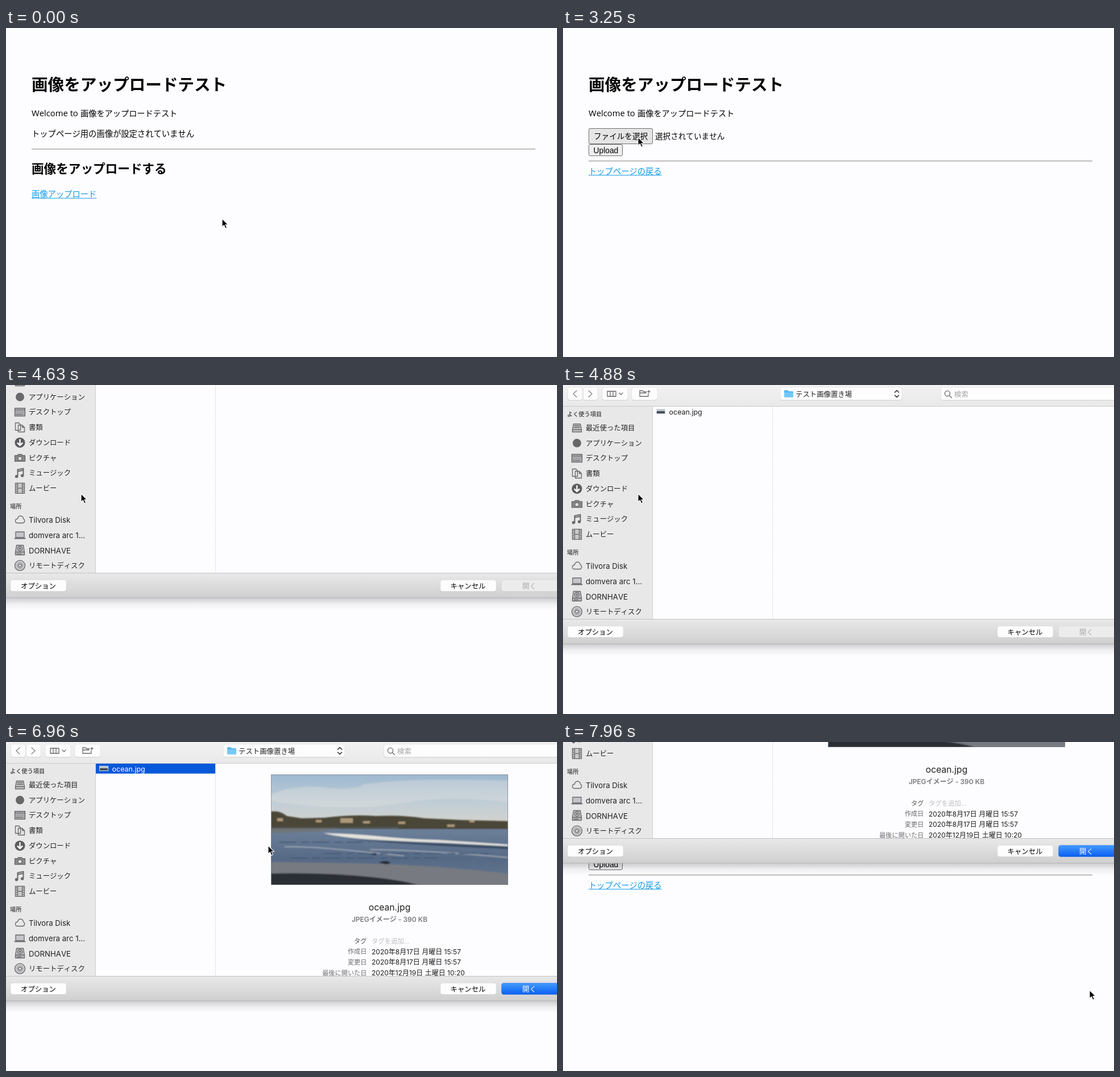
An HTML page for the animation above (8000 ms loop, 969 by 578 pixels).

```html
<!DOCTYPE html>
<html lang="ja">
<head>
<meta charset="utf-8">
<title>画像をアップロードテスト</title>
<style>
  html, body { margin: 0; width: 100%; height: 100%; overflow: hidden; background: #fdfdff; }
  svg { display: block; width: 969px; height: 578px; }
  text { font-family: Inter, 'Noto Sans CJK JP', 'Noto Sans CJK', sans-serif; font-kerning: none; white-space: pre; }
  .page text { font-family: 'Noto Sans CJK JP', 'Noto Sans CJK', sans-serif; }
  .page .welcome { font-family: 'Open Sans', 'Noto Sans', sans-serif; }
  .page .latin { font-family: 'Liberation Sans', Arial, sans-serif; }
  .icon { fill: none; stroke: #68686a; stroke-width: 1.3; stroke-linejoin: round; stroke-linecap: round; }
</style>
</head>
<body>
<svg id="stage" viewBox="0 0 969 578" xmlns="http://www.w3.org/2000/svg"></svg>
<script>
const LOOP = 8000, FPS = 24;
const LINK = '#109be6';

// y is the middle of the line
const text = (x, y, size, str, attrs = '') =>
  `<text x="${x}" y="${(y + size * 0.38).toFixed(1)}" font-size="${size}" ${attrs}>${str}</text>`;
const rect = (x, y, w, h, fill, attrs = '') =>
  `<rect x="${x}" y="${y}" width="${w}" height="${h}" fill="${fill}" ${attrs}/>`;
const path = (d, attrs = '') => `<path d="${d}" ${attrs}/>`;
const group = (id, body, attrs = '') => `<g id="${id}" ${attrs}>${body}</g>`;
const gradient = (id, ...colors) =>
  `<linearGradient id="${id}" x2="0" y2="1">${colors.map((c, i) =>
    `<stop offset="${i / (colors.length - 1)}" stop-color="${c}"/>`).join('')}</linearGradient>`;

const rule = y => rect(45, y, 886, 1, '#98948f') + rect(45, y + 1, 886, 1, '#e9e9ea');
const link = (y, str) =>
  text(45, y, 14.3, str, `fill="${LINK}"`) + rect(45, y + 6.6, str.length * 14.3, 1, LINK);
const formButton = (id, y, w, h) =>
  rect(45.5, y + .5, w - 1, h - 1, '#efefef', `id="${id}" rx="2.5" stroke="#6f6f72"`);
const macButton = (x, y, w, h, attrs = '') =>
  rect(x, y + .8, w, h, '#c2c2c2', 'rx="4"') + rect(x, y, w, h, '#fdfdfd', `rx="4" stroke="#d6d6d6" stroke-width=".5" ${attrs}`);

const heading =
  text(45, 99, 28.6, '画像をアップロードテスト', 'font-weight="700"') +
  text(45, 149.7, 14.8, 'Welcome to', 'class="welcome"') +
  text(131, 150, 14.2, '画像をアップロードテスト');

const topPage =
  text(45, 186, 14.3, 'トップページ用の画像が設定されていません') + rule(212) +
  text(45, 247, 21.6, '画像をアップロードする', 'font-weight="700"') +
  link(292, '画像アップロード');

const uploadPage =
  formButton('choose', 176, 113, 28) + text(54, 189.3, 13.6, 'ファイルを選択') +
  text(162, 189.3, 13.6, '選択されていません') +
  formButton('send', 204, 60, 21) + text(53.5, 214.3, 13.8, 'Upload', 'class="latin"') +
  rule(233) + link(251.5, 'トップページの戻る');

// Sidebar glyphs, centred on 0,0
const glyphs = {
  recent: path('M-6-7H6L8 3V7H-8V3ZM-8 3H8', 'fill="#c4c4c5"') + path('M-4.500-4H4.500M-5-1H5'),
  dot: '<circle r="7.5" fill="#68686a" stroke="none"/>',
  desk: rect(-9, -7, 18, 14, '#a6a6a8') + path('M-9-4H9M-6 4H6', 'stroke-dasharray="2 2"'),
  docs: path('M-8-8H-2L1-5V5H-8ZM-3-4H4L8 0V8H-3ZM4-4V0H8', 'fill="#e4e4e5"'),
  down: '<circle r="9" fill="#5d5d5f" stroke="none"/>' +
    path('M0-5V4M-4 1L0 5L4 1', 'stroke="#fff" stroke-width="2.4"'),
  camera: path('M-9-4H-5L-3-6H3L5-4H9V6H-9Z', 'fill="#88888a"') + '<circle cy="1" r="3.5" fill="#ddd"/>',
  music: path('M-4 6V-6L6-8V4M-4-3L6-5', 'stroke-width="2"') +
    '<circle cx="-6" cy="6" r="2" fill="#68686a"/><circle cx="4" cy="4.5" r="2" fill="#68686a"/>',
  film: rect(-8, -9, 16, 18, '#c9c9ca') + path('M-4-9V9M4-9V9M-4 0H4') +
    path('M-6-7V8M6-7V8', 'stroke-dasharray="1.5 2.5"'),
  cloud: path('M-5 5.5H5A4 4 0 0 0 6-2A5 5 0 0 0-4-2A3.8 3.8 0 0 0-5 5.5Z'),
  laptop: rect(-7.5, -6, 15, 10, '#c4c4ca') + path('M-9 5.5H9', 'stroke-width="2"'),
  disk: path('M-6-9H6L8 3V8H-8V3ZM-8 3H8', 'fill="#bcbcbe"') + '<circle cy="-3" r="4"/><circle cy="-3" r="1"/>' + path('M-5 6H2'),
  disc: '<circle r="9" fill="#c9c9cb"/><circle r="5" stroke-width=".6"/><circle r="2.5" fill="#eee"/>'
};
const places = [
  [75.5, 'recent', '最近使った項目'], [102, 'dot', 'アプリケーション'], [128.7, 'desk', 'デスクトップ'],
  [155.5, 'docs', '書類'], [182.2, 'down', 'ダウンロード'], [209, 'camera', 'ピクチャ'],
  [235.7, 'music', 'ミュージック'], [262.3, 'film', 'ムービー'], [318, 'cloud', 'Tilvora Disk'],
  [345, 'laptop', 'domvera arc 1...'], [371.5, 'disk', 'DORNHAVE'], [398.2, 'disc', 'リモートディスク']
];
const section = (y, str) => text(7, y, 10.2, str, 'font-weight="600" fill="#58585a"');
const sidebar = rect(0, 38, 157, 373, '#e8e8e8') + rect(157, 38, 1, 373, '#cfcfd0') +
  section(51.5, 'よく使う項目') + section(294.5, '場所') +
  places.map(([y, glyph, name]) =>
    `<g class="icon" transform="translate(24.5 ${y})">${glyphs[glyph]}</g>` +
    text(40, y, /[a-z]/i.test(name) ? 13.2 : 12.35, name, 'fill="#222"')).join('');

const toolbar = rect(0, 0, 969, 37, 'url(#bar)') + rect(0, 37, 969, 1, '#cbcbcc') +
  macButton(8.5, 4, 25.5, 22.5) + macButton(35.5, 4, 25.5, 22.5) +
  macButton(69, 4, 45, 22.5) + macButton(121, 4, 45, 22.5) +
  macButton(382, 4, 214, 22.5) + macButton(664.5, 4, 330, 22.5) +
  '<g class="icon">' +
  path('M24 10L18 15.5L24 21M45 10L51 15.5L45 21', 'stroke="#828284"') +
  path('M78 11H93V20H78ZM83 11V20M88 11V20M99 14L102 17L105 14') +
  path('M150 15V20H135V10H140L142 12H147M135 14H146M151 9.500V13.500M149 11.500H153') +
  path('M583.500 13L587 9.500L590.500 13M583.500 18L587 21.500L590.500 18', 'stroke="#333" stroke-width="1.6"') +
  '<circle cx="676" cy="15" r="4.600"/>' + path('M679.500 18.500L683.500 22.500') + '</g>' +
  path('M389 10.500Q389 9 390.500 9H395L397 11H403.500Q405 11 405 12.500V20Q405 21.500 403.500 21.500H390.500Q389 21.500 389 20Z', 'fill="#5bb7ee"') +
  rect(389, 13, 16, 8.5, '#74c8f8', 'rx="1"') +
  text(409, 15.8, 12.4, 'テスト画像置き場', 'fill="#222"') + text(688, 15.8, 12.4, '検索', 'fill="#a3a3a5"');

const footer = rect(0, 411, 969, 44, 'url(#foot)') + rect(0, 411, 969, 1, '#c2c2c2') +
  rect(0, 454.5, 969, 1, '#b0b0b8') + rect(0, 455.5, 969, 20.5, 'url(#shade)') +
  macButton(8, 423.5, 98, 20) + text(57, 434, 12.4, 'オプション', 'text-anchor="middle"') +
  macButton(764, 423.5, 98, 20) + text(812.5, 434, 12.4, 'キャンセル', 'text-anchor="middle"') +
  macButton(871.5, 423.5, 120, 20, 'id="open"') + text(908, 434, 12.4, '開く', 'id="openLabel"');

const details = [['タグ', 'タグを追加...'], ['作成日', '2020年8月17日 月曜日 15:57'],
  ['変更日', '2020年8月17日 月曜日 15:57'], ['最後に開いた日', '2020年12月19日 土曜日 10:20']];
const info =
  text(674.5, 290, 15.8, 'ocean.jpg', 'text-anchor="middle" fill="#222"') +
  text(674.5, 311.5, 12, 'JPEGイメージ - 390 KB', 'text-anchor="middle" font-weight="600" fill="#7b7b7d"') +
  details.map(([label, value], i) => {
    const y = 349.5 + i * 18.6;
    return text(634.5, y, 11.2, label, `text-anchor="end" fill="${i ? '#6d6d6f' : '#555'}"`) +
      text(643, y, i ? 12 : 11.4, value, `fill="${i ? '#1c1c1c' : '#bdbdc0'}"`);
  }).join('');

const scenery =
  path('M466 92Q510 74 560 80T630 74Q720 62 883 68V106Q780 92 690 108T466 104Z', 'fill="#e9e5df" opacity=".35"') +
  path('M466 122Q482 120 494 130L520 134L560 133Q610 127 650 130Q700 128 735 134L800 137L883 139V154H466Z', 'fill="#4b4737"') +
  [[477, 134, 10, 5], [545, 137, 10, 4], [588, 134, 22, 8], [628, 139, 12, 4], [690, 140, 12, 4], [776, 145, 13, 4], [815, 138, 9, 3]]
    .map(([x, y, w, h]) => rect(x, y, w, h, '#ae9a79')).join('') +
  path('M466 150H560L690 149V154H466Z', 'fill="#555657"') +
  rect(460, 153, 430, 104, 'url(#sea)') +
  path('M466 160L555 157L590 152H466Z', 'fill="#6f7478"') +
  path('M558 160Q610 161 660 166T760 172L883 180V183L770 177Q690 174 640 171T558 160Z', 'fill="#e4e2dc"') +
  path('M600 171Q700 176 883 184V188Q740 183 600 171Z', 'fill="#374860"') +
  path('M490 184Q540 184 590 189T700 200M640 189Q740 190 883 203', 'fill="none" stroke="#a9b0ba" stroke-width="1.500"') +
  path('M480 176H640M560 196H850M500 204H760', 'stroke="#43566f" stroke-dasharray="30 9 14 6" stroke-width="1.500"') +
  path('M466 211Q560 212 650 214T883 231V257H466Z', 'fill="#777a80"') +
  path('M466 231Q560 229 640 237T735 257H466Z', 'fill="#2c2e34"') +
  path('M640 197L652 195L650 199ZM655 212Q667 206 677 212L670 215Z', 'fill="#262a32"');
const photo = rect(466, 57, 417, 98, 'url(#sky)') +
  `<g clip-path="url(#frame)"><g filter="url(#soft)">${scenery}</g></g>` +
  rect(466.5, 57.5, 416, 193, 'none', 'stroke="#777c84" stroke-opacity=".6"');

const fileRow = rect(158, 38, 210, 17.5, '#0558d9', 'id="rowFill"') +
  rect(164.5, 42.5, 15, 8, '#b9c5cd', 'stroke="#dadada"') + rect(165, 46, 14, 4, '#44505c') +
  text(186.5, 47.5, 12.5, 'ocean.jpg', 'id="rowLabel"');

const dialog = rect(0, 0, 969, 455, '#fdfdff') + toolbar + sidebar +
  path('M368.500 38V411', 'stroke="#d8d8d4" stroke-dasharray="2 1"') +
  fileRow + group('info', info) + group('photo', photo) + footer;

const arrow = path('M0 0V14.500L3.400 11.400L5.800 17L8.400 15.900L6 10.500H10.500Z', 'fill="#000" stroke="#fff" stroke-width="1.1"');
const hand = path('M-1.500 1.500Q0-.5 1.500 1.500L3 6L4.500 5.200L6 6.300L7.600 5.800L8.800 7.200Q10.500 6.800 10.500 8.500Q11 12 8.500 17H1Q-1.500 13-4.500 10.500Q-5 8.500-2.500 9L.3 10.500Z',
  'fill="#fff" stroke="#222" stroke-width="1.2" stroke-linejoin="round"') +
  path('M3 10.500V14.500M5.300 10.500V14.500M7.600 10.500V14.500', 'stroke="#222"');

document.getElementById('stage').innerHTML = '<defs>' +
  gradient('bar', '#f2f2f2', '#e9e9e9') + gradient('foot', '#e9e9e9', '#cfcfcf') +
  gradient('blue', '#449afd', '#0a5ff0') + gradient('sky', '#9db8d0', '#c0cdd6', '#dad5cb') +
  gradient('sea', '#6c809a', '#566a86', '#66788f') +
  gradient('shade', 'rgba(20,20,30,.2)', 'rgba(20,20,30,.06)', 'rgba(20,20,30,0)') +
  `<clipPath id="frame">${rect(466, 57, 417, 194, '#000')}</clipPath>` +
  '<filter id="soft"><feGaussianBlur stdDeviation=".8"/></filter></defs>' +
  rect(0, 0, 969, 578, '#fdfdff') +
  `<g class="page">${heading}${group('topPage', topPage)}${group('uploadPage', uploadPage)}</g>` +
  group('dialog', dialog) + group('cursor', group('arrow', arrow) + group('hand', hand));

const $ = id => document.getElementById(id);
const show = (id, on) => $(id).setAttribute('visibility', on ? 'inherit' : 'hidden');
const paint = (id, fill) => $(id).setAttribute('fill', fill);
const move = (id, x, y) => $(id).setAttribute('transform', `translate(${x} ${y})`);
const ease = p => (p = Math.min(1, Math.max(0, p)), p * p * (3 - 2 * p));

// time, x, y of the pointer tip
const track = [
  [0, 380, 335], [400, 374, 383], [860, 343, 320], [1680, 154, 307], [2000, 131, 291], [2600, 131, 291],
  [3300, 132, 191], [5050, 132, 191], [5950, 211, 46], [6600, 211, 46], [7500, 926, 436], [LOOP, 926, 436]
];
const AT = { upload: 2380, press: 4300, opening: 4435, select: 6150, preview: 6400, closing: 7822.7 };
const SLIDE = 260;

function pointer(t) {
  const i = track.findIndex(k => k[0] > t);
  const [t0, x0, y0] = track[i - 1], [t1, x1, y1] = track[i];
  const p = ease((t - t0) / (t1 - t0));
  return [x0 + (x1 - x0) * p, y0 + (y1 - y0) * p];
}
const inside = ([x, y], l, t, r, b) => x >= l && x <= r && y >= t && y <= b;

function draw(t) {
  const uploading = t >= AT.upload, selected = t >= AT.select;
  const tip = pointer(t);
  const drop = ease((t - AT.opening) / SLIDE) - ease((t - AT.closing) / SLIDE);

  show('topPage', !uploading);
  show('uploadPage', uploading);
  const hover = inside(tip, 45, 176, 158, 203);
  paint('choose', hover ? (t >= AT.press ? '#dcdcdc' : '#e5e5e5') : '#efefef');

  show('dialog', drop > 0);
  move('dialog', 0, Math.round((drop - 1) * 455));
  show('rowFill', selected);
  show('info', selected);
  show('photo', t >= AT.preview);
  paint('rowLabel', selected ? '#fff' : '#222');
  paint('open', selected ? 'url(#blue)' : '#ececec');
  $('open').setAttribute('stroke', selected ? '#2a78ee' : '#d6d6d6');
  paint('openLabel', selected ? '#fff' : '#a9a9ab');

  const onLink = !drop && (uploading ? inside(tip, 45, 244, 173, 260) : inside(tip, 45, 284, 160, 300));
  show('hand', onLink);
  show('arrow', !onLink);
  move('cursor', Math.round(tip[0]), Math.round(tip[1]));
}

const start = performance.now();
function tick() {
  const t = (performance.now() - start) % LOOP;
  draw(Math.floor(t * FPS / 1000) * 1000 / FPS);
  requestAnimationFrame(tick);
}
tick();
</script>
</body>
</html>
```
